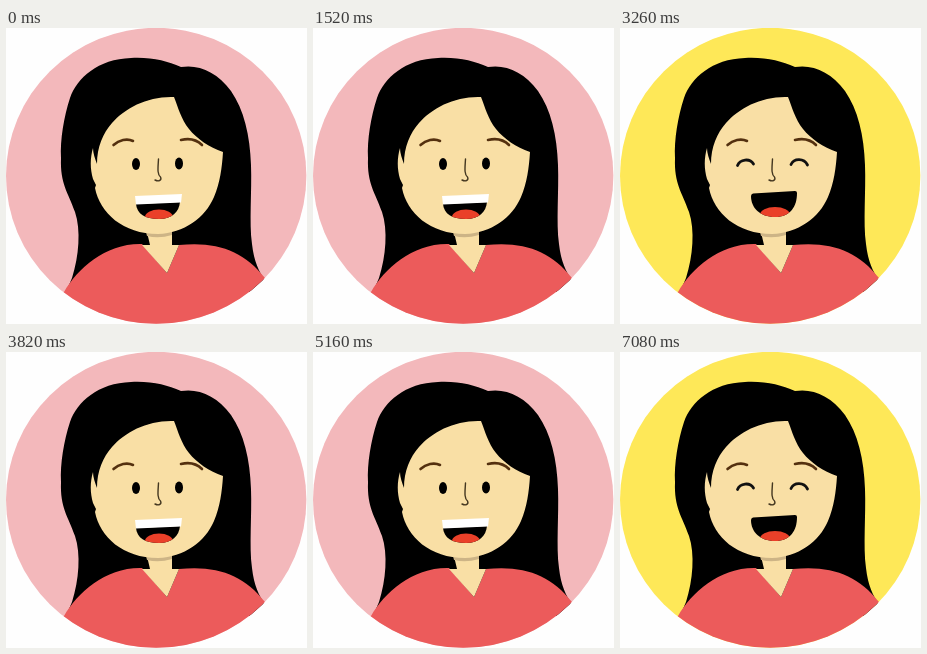
Write an HTML page that moves like this. It is 301x296 px and loops after 7460 ms.

```html
<!DOCTYPE html>
<html lang="en">
<head>
<meta charset="utf-8">
<title>Laughing portrait</title>
<style>
  html, body { margin: 0; width: 100%; height: 100%; overflow: hidden; background: #fefefe; }
  svg { display: block; width: 100vw; height: 100vh; }
  .line { fill: none; stroke: #111; stroke-linecap: round; stroke-linejoin: round; }
  #backdrop { fill: #f3b8bb; }
  .skin { fill: #f9dfa5; }
  .laughing #backdrop { fill: #fee858; }
  .laughing #smile, svg:not(.laughing) #laugh { display: none; }
</style>
</head>
<body>
<svg id="portrait" viewBox="0 0 301 296">
  <defs>
    <clipPath id="disc"><ellipse cx="150.2" cy="147.8" rx="150.2" ry="148"/></clipPath>
    <clipPath id="smileShape"><path d="M130 176L174 174C173 184 166 191 153 191C139 191 131 186 130 176Z"/></clipPath>
    <clipPath id="laughShape"><path d="M133 165.5L175 163Q177 163 177 165C177 179 170 189 155 189C140 189 131 180 131 168Q131 166 133 165.5Z"/></clipPath>
  </defs>

  <g clip-path="url(#disc)">
    <rect id="backdrop" width="301" height="296"/>
    <path id="hair" d="M60 264L66 250C73 228 75 202 69 184C62 164 54 156 55 130C54 112 58 88 64 70C71 50 92 31 125 30C146 29 161 33 175 39C193 36 211 44 225 63C238 82 244 107 245 137C246 164 243 194 246 216C248 234 253 243 259 253V264Z"/>
    <path id="shirt" fill="#ec5b5b" d="M58 264C72 240 100 215 136 216L161 245L173 217C211 213 238 223 259 250L301 300H10Z"/>
    <path class="skin" d="M140 200H166V217H173L161 245L136 217H144Z"/>
    <path fill="#cdb486" d="M140 204H166V207Q153 211 141 208Z"/>
    <path class="skin" d="M168 69C142 68 119 80 106 95C97 105 91 119 91 136C89 131 87 125 87 120C84 130 84 141 87 151L90 157L89 160C94 185 117 206 152 206C178 205 199 190 208 169C214 155 216 140 217 124C203 119 191 111 183 101C175 91 172 79 168 69Z"/>
  </g>

  <g class="line" style="stroke:#54300f" stroke-width="2.6">
    <path d="M107.5 117C113 112 121 110 127 113"/>
    <path d="M175 112C183 110 191 112 196 117"/>
  </g>
  <path class="line" style="stroke:#443720" stroke-width="1.4" d="M152.5 131C152 140 151 146 154.5 149C156 152 153 154 149 152"/>

  <g id="smile">
    <ellipse cx="130" cy="136" rx="4" ry="6"/>
    <ellipse cx="173" cy="135.5" rx="4" ry="6"/>
    <g clip-path="url(#smileShape)">
      <rect x="125" y="160" width="55" height="35"/>
      <ellipse cx="153" cy="189" rx="14" ry="7.5" fill="#ea4029"/>
    </g>
    <path fill="#fff" d="M129 168L176 166L175 174.5L130 176.5Z"/>
  </g>

  <g id="laugh">
    <g class="line" stroke-width="2.8">
      <path d="M117.5 137.5C120 131 130 130 133.5 136"/>
      <path d="M171 136.5C174 130 184 130 187.5 137"/>
    </g>
    <g clip-path="url(#laughShape)">
      <rect x="125" y="160" width="55" height="35"/>
      <ellipse cx="155" cy="187" rx="15" ry="8" fill="#ea4029"/>
    </g>
  </g>
</svg>
<script>
  const LOOP = 7460;
  const laughs = [
    [820, 1520], [2160, 2660], [3260, 3780],
    [4560, 5120], [5820, 6240], [7080, LOOP]
  ];
  const portrait = document.getElementById('portrait');

  function draw() {
    const time = performance.now() % LOOP;
    portrait.classList.toggle('laughing', laughs.some(([start, end]) => time >= start && time < end));
    requestAnimationFrame(draw);
  }
  draw();
</script>
</body>
</html>
```
